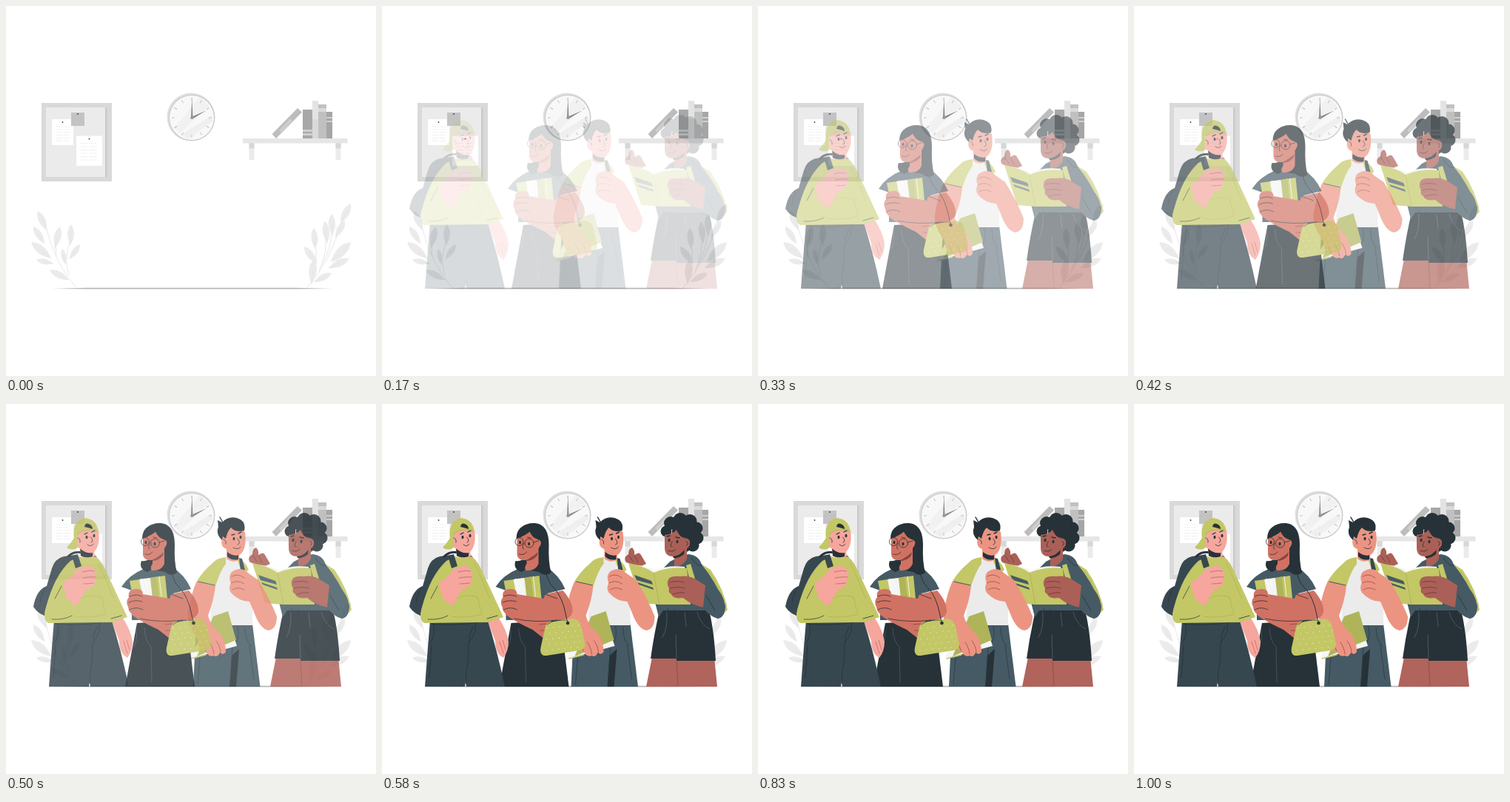
Write an HTML page that moves like this. It is 500 px wide and 500 px high and loops after 1.04 s.

```html
<!DOCTYPE html>
<html lang="en">
<head>
<meta charset="utf-8">
<title>Students</title>
<style>
html, body { margin: 0; width: 100%; height: 100%; overflow: hidden; background: #fff; }
svg { display: block; width: 100%; height: 100%; }
</style>
</head>
<body>
<svg id="stage" viewBox="0 0 500 500"></svg>
<script>
const INK = '#263238', NAVY = '#37474f', SLATE = '#455a64', LIME = '#c3c765', OLIVE = '#afb459';

const fill = (d, c) => `<path d="${d}" fill="${c}"/>`;
const line = (d, c = INK, w = .8) =>
  `<path d="${d}" fill="none" stroke="${c}" stroke-width="${w}" stroke-linecap="round" stroke-linejoin="round"/>`;
const rect = (x, y, w, h, c) => `<rect x="${x}" y="${y}" width="${w}" height="${h}" fill="${c}"/>`;
const dot = (x, y, r, c = INK) => `<circle cx="${x}" cy="${y}" r="${r}" fill="${c}"/>`;
const eye = (x, y) => `<ellipse cx="${x}" cy="${y}" rx="1.5" ry="2.2" fill="${INK}"/>`;
const range = (n, f) => Array.from({ length: n }, (_, i) => f(i)).join('');

// Leaf from its base to its tip
function leaf([x, y, u, v]) {
  const nx = (v - y) * .32, ny = (x - u) * .32;
  const mx = x + (u - x) * .58, my = y + (v - y) * .58;
  return fill(`M${x} ${y}Q${mx + nx} ${my + ny} ${u} ${v}Q${mx - nx} ${my - ny} ${x} ${y}`, '#ebebeb')
    + line(`M${x} ${y}L${mx} ${my}`, '#dedede', .5);
}

function board() {
  const page = (x, y, w, h) => rect(x, y, w, h, '#fff') + dot(x + w / 2, y + 4, 1, '#555')
    + range(6, i => line(`M${x + 6} ${y + 10 + i * h / 9}h${w * .25}m${w * .1} 0h${w * .25}`, '#ececec', .8));
  return rect(48, 131, 95, 106, '#d9d9d9') + rect(54, 137, 82.5, 94, '#c9c9c9') + rect(54, 137, 80, 94, '#ebebeb')
    + page(62, 153, 29, 35) + page(95, 175.5, 35, 40.5)
    + rect(88, 144, 18, 18, '#c3c3c3') + dot(97, 146, 1, '#444');
}

function clock() {
  return dot(250, 150, 32.5, '#e0e0e0') + dot(251, 151, 31.3, '#cbcbcb') + dot(251, 151, 30, '#f8f8f8')
    + fill('M227 165L262 123L274 134L235 172Z', '#f1f1f1')
    + fill('M237 174L278 148L279 156L246 180Z', '#efefef')
    + range(12, i => `<path d="M251 124v4" stroke="#bbb" stroke-width=".9" transform="rotate(${i * 30} 251 151)"/>`)
    + fill('M250 152L251.3 123L252.5 152Z', '#888') + fill('M250.5 150L271 141L252 152.5Z', '#888')
    + dot(251.2, 151, 2, '#999');
}

function shelf() {
  return rect(328.5, 185, 7, 23, '#ebebeb') + rect(445.5, 185, 7, 23, '#ebebeb')
    + rect(328.5, 185, 7, 7.5, '#d7d7d7') + rect(445.5, 185, 7, 7.5, '#d7d7d7')
    + rect(320, 179, 141.5, 6.5, '#e6e6e6')
    + fill('M359.5 173L394 138L400 143.5L365 179Z', '#bdbdbd')
    + fill('M369 168L384 152L387 155L372 171Z', '#cdcdcd')
    + rect(401, 140, 13, 39, '#a8a8a8') + rect(401, 167, 13, 3, '#cfcfcf') + rect(401, 172, 13, 3, '#cfcfcf')
    + rect(414, 128, 8, 51, '#d9d9d9') + rect(414, 128, 8, 25, '#e3e3e3')
    + rect(422, 133, 11, 46, '#c0c0c0') + rect(422, 138, 11, 5, '#dadada')
    + rect(433, 143, 8, 36, '#a6a6a6') + rect(433, 150, 8, 2, '#cfcfcf') + rect(433, 155, 8, 2, '#cfcfcf');
}

function plants() {
  const leaves = [
    [55, 303, 43, 277], [52, 321, 37, 298], [66, 327, 73, 298], [61, 341, 34, 319], [87, 323, 88, 295],
    [64, 348, 41, 343], [86, 342, 100, 322], [80, 349, 76, 328], [85, 370, 59, 357],
    [452, 293, 466, 267], [445, 313, 458, 290], [441, 310, 440, 281], [434, 320, 431, 291], [418, 328, 416, 300],
    [439, 346, 466, 319], [420, 348, 403, 325], [436, 354, 464, 341], [413, 375, 416, 342], [416, 373, 440, 361]
  ];
  return ['M95 380Q67 350 54 298', 'M85 363Q77 345 88 312', 'M68 338Q66 325 70 312',
    'M407 381Q442 340 454 288', 'M427 350Q441 325 440 300', 'M423 358Q434 335 432 310', 'M412 373Q424 345 417 318']
    .map(d => line(d, '#e3e3e3', .8)).join('') + leaves.map(leaf).join('');
}

function capBoy() {
  const skin = '#f6a69d';
  return fill('M94 204L78 206Q66 209 62 222L55 246Q41 251 37 274Q43 284 58 288L84 240Z', NAVY)
    + line('M84 206Q92 198 104 201T121 207', INK, 3)
    + line('M55 248Q48 254 46 268')
    + fill('M143 294L157 288Q169 306 171 321Q171 334 164 343Q153 337 153 320Z', skin)
    + line('M159 321L164 337M163 319L167 332', '#a85c58', .6)
    + fill('M65 292L142 290Q155 330 166 382L114 382L113 376L112 382L58 382Q61 340 65 292', NAVY)
    + line('M127 296Q126 315 117 322L116 350Q112 365 114 378M70 297Q72 315 65 323M124 300Q117 312 118 320M67 326L64 370M66 297Q95 301 130 295')
    + fill('M99 206Q108 210 121 206Q128 211 133 221L164 288L143 295L57 296Q49 291 54 275Q65 232 87 212Z', LIME)
    + line('M93 287L99 263Q114 256 129 261L135 284Q115 290 93 287M125 216Q138 242 145 262', OLIVE)
    + line('M142 290L156 286')
    + fill('M89 205L97 203L102 219L94 222Z', NAVY)
    + fill('M100 188L118 190L120 206Q111 211 101 206Z', skin)
    + fill('M100 195Q107 202 117 201L117 206Q108 209 101 205Z', INK)
    + fill('M77 242L92 230Q94 222 105 220Q117 216 119 224Q125 228 121 234Q125 240 118 243Q119 249 108 251L97 271Q91 276 83 271Z', skin)
    + fill('M54 275Q61 251 75 239Q73 251 86 267L99 275L91 294L60 296Q49 292 54 275', LIME)
    + line('M66 263L75 246M62 291Q78 292 89 286', INK, .7)
    + line('M103 227Q114 224 119 226M104 235Q114 233 121 234M105 243Q113 243 118 242', '#a85c58', .7)
    + fill('M96 177Q103 164 119 168L125 172Q128 190 119 200Q111 204 101 196Q93 193 94 183Z', skin)
    + fill('M92 181Q89 157 107 154Q123 156 125 173Q112 169 103 171L97 178L97 194Q89 199 82 194Q87 189 92 181', LIME)
    + fill('M106 166Q107 160 112 162Q117 164 117 169Q111 167 106 166', INK)
    + line('M97 175Q108 166 125 172', OLIVE)
    + eye(109, 180) + eye(119, 178)
    + line('M106 176L110 174M116 173L120 171', INK, 1.3)
    + line('M115 180Q119 186 115 187M110 190Q115 194 118 189M97 181Q101 182 100 187', INK, .8);
}

function bagGirl() {
  const skin = '#d07263', dark = '#8d433d';
  return fill('M173 296L240 292L251 382L157 382Z', INK)
    + line('M183 303Q184 321 192 328L193 376M172 305Q174 322 168 329M226 305L233 338', '#4a5960')
    + fill('M184 222Q162 231 152 247L166 252L166 292L230 292L222 256L246 250Q238 231 219 219Z', SLATE)
    + fill('M181 180C182 169 190 161 203 161C217 161 224 171 224 190Q223 213 227 228Q219 234 211 227L190 223L194 196Z', INK)
    + fill('M194 206Q188 213 179 212Q175 223 187 227L197 221Z', INK)
    + fill('M194 203L210 193L210 216Q206 226 193 225Q190 221 194 216Z', skin)
    + fill('M194 209Q203 207 209 200L208 205Q202 212 194 212Z', dark)
    + fill('M181 181Q194 176 197 170Q201 181 209 183Q216 185 212 192Q209 197 207 197Q201 209 193 211Q180 212 181 200Z', skin)
    + fill('M180 182Q180 167 194 163L201 170Q193 178 180 182', INK)
    + eye(185, 187) + eye(197, 189)
    + `<g fill="none" stroke="${INK}" stroke-width=".8"><circle cx="184" cy="186" r="5.5"/><circle cx="197.5" cy="188" r="6"/></g>`
    + line('M203 187L210 185M190 188Q187 196 190 196M184 203Q190 205 194 200M183 179L187 179M195 180L200 181')
    + fill('M163 239L211 232L214 263L168 264Z', LIME)
    + fill('M176 237L191 235L196 260L181 262Z', '#f4f4f4') + fill('M191 235L200 233L203 262L194 263Z', OLIVE)
    + line('M179 236L185 260M183 236L187 249M203 233L206 260', '#fff')
    + fill('M165 284Q176 293 202 305L216 316Q225 319 227 311Q233 305 229 299Q231 292 219 291L180 283Z', skin)
    + line('M211 298Q223 296 228 299M212 306Q222 306 227 308', dark)
    + fill('M219 257L243 252Q257 268 256 281Q253 292 237 292Q204 294 180 288Q162 287 161 274Q157 267 162 261Q160 251 171 250Q181 249 181 257L217 263Z', skin)
    + line('M163 260Q172 256 180 260M162 268Q171 264 180 267M163 278Q172 273 181 278M177 290Q205 296 235 292M219 257L235 263', INK)
    + line('M220 223Q220 238 231 249T247 285L249 296', INK, 1)
    + fill('M219 302Q221 293 230 294L256 290Q265 290 268 301L273 324Q273 332 265 333L221 340Q211 341 213 329Z', LIME)
    + range(30, i => {
        const row = i / 6 | 0, x = 220 + i % 6 * 8.5 + row % 2 * 4;
        return dot(x + (4 - row) * .4, 303 + row * 7.5 - (x - 220) * .1, .75, '#e5e8b2');
      })
    + line('M222 298Q228 291 249 292L249 296', INK, .8) + dot(249.5, 296, 2.3);
}

function teeBoy() {
  const skin = '#ec9482', dark = '#9b4f48';
  return fill('M261 298L337 297L347.5 382L257 382Z', SLATE)
    + fill('M309 340L319 331L315 382L306 382Z', INK)
    + line('M317 300Q321 319 310 329L307 376M327 302Q327 319 335 327M266 343L263 379M333 326L339 372', '#2d3d45')
    + fill('M299 208L321 210L337 239L337 299L280 299L283 240Z', '#ebebeb')
    + fill('M301 207Q288 208 282 216Q271 225 262 239L287 246Q294 224 301 216Z', LIME)
    + fill('M316 209Q327 211 332 224L326 229L319 218Z', LIME)
    + fill('M319 208L323 209L327 224L321 226Z', NAVY)
    + fill('M302 193L320 196L319 210Q311 216 302 209Z', skin)
    + fill('M303 200Q311 206 318 204L318 210Q309 212 303 206Z', INK)
    + fill('M298 178Q305 161 321 167L327 173Q330 194 321 203Q311 208 302 196Q293 193 296 182Z', skin)
    + fill('M296 184Q287 176 291 166L290 157L296 160Q304 151 316 154Q329 158 326 171Q314 174 308 167Q303 172 301 182L297 179Z', INK)
    + line('M297 160L293 153', INK, 1.5)
    + eye(312, 182) + eye(321, 180)
    + line('M309 177L313 176M318 175L322 173', INK, 1.4)
    + line('M317 182Q322 189 317 190M311 194Q318 198 321 193M298 183Q302 184 301 189')
    + fill('M285 288L302 283L316 327L253 344L252 341Z', '#f5f5f5')
    + fill('M284 287L304 280L315 319L262 341Z', OLIVE)
    + line('M254 344L274 339', LIME, 1.3)
    + fill('M262 239L287 246Q285 265 277 286Q280 299 294 311Q301 322 301 335Q298 340 293 336Q290 343 285 340Q278 343 273 333Q264 333 263 317Q248 298 250 282Q254 256 262 239', skin)
    + line('M279 322Q284 329 285 338M288 320Q294 328 294 336M270 325L274 334', dark)
    + line('M264 240L286 245')
    + fill('M309 227Q322 218 332 229L345 238Q360 262 370 287Q370 304 359 306Q347 304 339 281L333 267Q319 267 308 255Q304 248 308 242Q304 233 309 227', skin)
    + line('M309 233Q317 228 326 235M308 242Q317 237 326 243M310 251Q317 246 326 251', dark);
}

function readerGirl() {
  const skin = '#ab6057', leg = '#b0645b';
  const curls = [[384, 172, 7.5], [390, 161, 9], [403, 156.5, 9.5], [416, 158.5, 9.5], [425, 168, 8.5],
    [426, 181, 8.5], [420, 191, 8.5], [410, 193, 7], [408, 172, 16]];
  return fill('M428 214L444 224Q462 250 467 278L459 286Z', LIME)
    + line('M441 226Q457 249 464 278', OLIVE)
    + fill('M365 342L400 343L401 382L357 382Z', leg) + fill('M397 342L449 342L453 382L398 382Z', leg)
    + line('M398 347L400 381', '#8d4a44')
    + fill('M376 275L440 273Q448 296 451 347L398 347L398 344L363 344Q368 308 376 275', INK)
    + line('M385 281Q386 305 379 315M426 281Q430 298 443 304M409 282L411 301M397 312L398 343', '#52616a')
    + fill('M389 213Q400 207 414 203Q428 204 432 217Q450 238 464 272Q464 288 454 290L437 275L438 279L380 279L374 288L369 268L380 222Z', SLATE)
    + line('M418 208Q427 221 432 218M438 259L451 281M386 277L387 289M395 278L397 292', INK)
    + fill('M411 218L417 216L423 236L416 240Z', LIME)
    + curls.map(c => dot(...c)).join('')
    + fill('M395 196L412 190L412 209Q407 220 395 219Z', skin)
    + fill('M392 204Q402 204 409 197L408 203Q401 209 394 208Z', INK)
    + fill('M382 177Q393 176 398 170Q402 180 409 181Q418 182 416 190Q414 196 410 195Q404 205 393 206Q382 206 382 194Z', skin)
    + eye(388, 184) + eye(399, 186)
    + line('M385 179L389 178M397 180L402 181', INK, 1.3)
    + line('M392 186Q388 193 392 193M387 198Q393 201 397 196M411 186Q415 186 412 191')
    + fill('M330 214Q325 208 333 203Q333 195 338 194Q342 198 341 204Q348 199 350 204L357 216L348 220Z', skin)
    + line('M334 205L339 213M341 205L346 214', '#743a36')
    + fill('M340 217Q359 219 369 225Q386 217 409 220L414 265L374 268Z', '#f4f4f4')
    + fill('M333 215Q355 219 367 228L375 271L350 269Z', LIME)
    + fill('M367 228Q388 219 412 222L417 271L374 271Z', LIME)
    + fill('M341 231L364 239L366 244L344 238ZM345 241L366 248L367 251L347 244Z', SLATE)
    + line('M367 228L375 271', OLIVE, 1)
    + fill('M387 237Q390 232 402 233Q415 231 424 237L440 247L436 275Q418 272 407 262Q393 264 391 257Q386 254 388 249Q384 243 387 237', skin)
    + line('M389 241Q400 238 408 241M389 249Q400 246 409 249M393 257Q401 254 409 255', '#6f3733')
    + fill('M437 245Q454 243 462 265Q466 285 454 290Q440 286 434 274Z', SLATE)
    + line('M438 259L450 279', INK);
}

const cast = { readerGirl, teeBoy, bagGirl, capBoy };
stage.innerHTML = board() + clock() + shelf() + plants()
  + fill('M62 382L110 380.8H390L442 382L390 382.6H110Z', '#b8b8b8')
  + Object.keys(cast).map(id => `<g id="${id}" opacity="0">${cast[id]()}</g>`).join('');

// Sideways shift as [tick, pixels], with a slight overshoot
const slide = [[2, -21], [6, -15], [8, -11], [12, -4], [14, -1.5], [16, -.2], [20, 1], [24, 0]];
function shiftAt(k) {
  const i = slide.findIndex(s => s[0] >= k);
  if (i <= 0) return i ? 0 : slide[0][1];
  const [a, x] = slide[i - 1], [b, y] = slide[i];
  return x + (y - x) * (k - a) / (b - a);
}

const LOOP = 1040, TICK = 1000 / 24;
const parts = Object.keys(cast).map(id => document.getElementById(id));
const [, boy, girl] = parts;

function draw() {
  const k = Math.floor((performance.now() % LOOP + 6) / TICK);
  const alpha = Math.max(0, Math.min(1, (k - 1.7) / 12.3));
  const x = shiftAt(k);
  parts.forEach(p => p.setAttribute('opacity', alpha));
  boy.setAttribute('transform', `translate(${x})`);
  girl.setAttribute('transform', `translate(${-x})`);
  requestAnimationFrame(draw);
}
draw();
</script>
</body>
</html>
```
